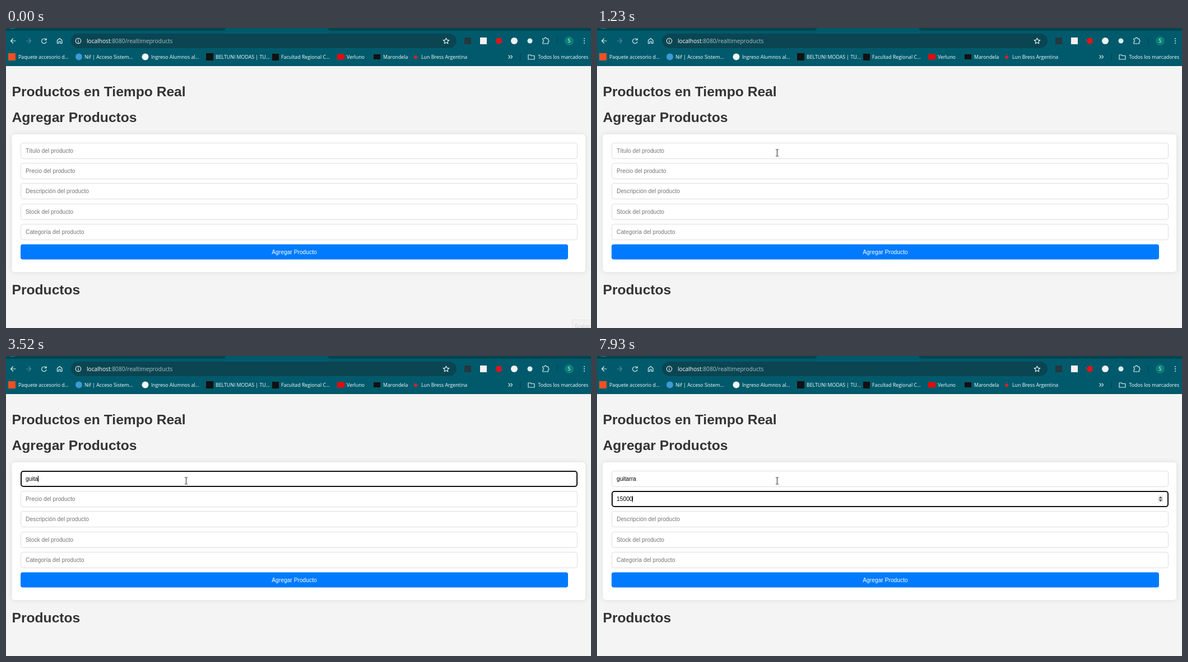
These frames come from a looping animation (1044x536 px, 8 s). An HTML page:

```html
<!DOCTYPE html>
<html lang="es">
<head>
<meta charset="utf-8">
<title>Productos en Tiempo Real</title>
<style>
  html, body { margin: 0; width: 100%; height: 100%; overflow: hidden; background: #f4f4f4; }
  svg { display: block; width: 100%; height: 100%; }
  text { white-space: pre; }
  .ui { font: 8.8px "Open Sans", "Noto Sans", sans-serif; fill: #fff; }
  .url { font-size: 10.17px; }
  .page { font: 10.27px "Liberation Sans", Arial, sans-serif; }
  .title { font-size: 24.64px; font-weight: bold; fill: #333; }
  .hint { fill: #757575; }
  .line { fill: none; stroke: #d9eef2; stroke-width: 1.2; stroke-linecap: round; stroke-linejoin: round; }
  #card { fill: #fff; filter: drop-shadow(0 0 4px rgba(0, 0, 0, .1)); }
  .field { fill: #fff; stroke: #ddd; }
  .field.focus { stroke: #101010; stroke-width: 2; }
</style>
</head>
<body>
<svg id="stage" viewBox="0 0 1044 536">
  <rect width="1044" height="536" fill="#f4f4f4"/>

  <g id="browser">
    <rect width="1044" height="68" fill="#005a6c"/>
    <path d="M0 0H392V1Q392 5 387 5H0ZM574 0H1044V5H580Q575 5 574 0Z" fill="#034450"/>
    <rect x="7" width="9" height="1" fill="#1b8092"/>
    <rect x="116" y="10" width="688" height="26" rx="13" fill="#0b4552"/>

    <g class="line">
      <path d="M17 23H8.500M12.500 19L8.500 23L12.500 27"/>
      <path d="M36 23H44.500M40.500 19L44.500 23L40.500 27" opacity=".35"/>
      <path d="M71.500 21A4.300 4.300 0 1 0 72 24.500M72 18.500V21.500H69"/>
      <path d="M91.500 22L95.800 18.500L100 22V27.500H97.300V24H94.300V27.500H91.500Z"/>
      <circle cx="129" cy="23" r="4.700"/>
      <path d="M129 22.800V25.300M129 20.600V20.700"/>
      <path d="M785.500 18L787 21.300L790.700 21.700L788 24.200L788.700 27.800L785.500 26L782.300 27.800L783 24.200L780.300 21.700L784 21.300Z"/>
      <path d="M958 19H961A1.800 1.800 0 0 1 964.600 19H967.500V21.500A1.800 1.800 0 0 1 967.500 25V28H958V25A1.800 1.800 0 0 0 958 21.500Z"/>
      <path d="M897 49L899.500 51.700L897 54.400M901 49L903.500 51.700L901 54.400"/>
      <path d="M932 48H936L937.500 49.500H943V56H932Z"/>
    </g>
    <path d="M984 17V29M918 46V58" stroke="#043f4b" fill="none"/>
    <circle cx="1005" cy="23" r="8" fill="#087f75"/>
    <text class="ui" x="1002.600" y="26">S</text>
    <text class="ui url" x="144" y="27">localhost<tspan fill="#a8c3c9">:8080/realtimeproducts</tspan></text>
    <g id="dots" fill="#e6f2f4"><circle cx="1032" cy="19" r="1"/><circle cx="1032" cy="23" r="1"/><circle cx="1032" cy="27" r="1"/></g>
  </g>

  <g class="page">
    <text class="title" x="10.500" y="122">Productos en Tiempo Real</text>
    <text class="title" x="10.500" y="167.500">Agregar Productos</text>
    <rect id="card" x="10.500" y="190" width="1023.500" height="246" rx="5"/>
    <g id="form"></g>
    <rect id="button" x="26" y="386.500" width="977" height="27" rx="4"/>
    <text x="514.500" y="403.500" text-anchor="middle" fill="#fff">Agregar Producto</text>
    <text class="title" x="10.500" y="476">Productos</text>
    <g id="spinner">
      <rect x="1001" y="249" width="10" height="13" fill="#efefef"/>
      <path d="M1002.500 254.500L1005.700 251L1009 254.500ZM1002.500 256.500L1005.700 260L1009 256.500Z" fill="#444"/>
    </g>
    <path id="caret" d="M.5 0V11" stroke="#000"/>
  </g>

  <g id="tip">
    <rect x="1010.500" y="521.500" width="40" height="20" fill="#f2f2f2" stroke="#e6e6e6"/>
    <text class="ui" x="1015" y="536" style="fill:#ccc">Grabar</text>
  </g>

  <circle id="click" cx="320" cy="223" r="9" fill="#fbf560"/>
  <path id="arrow" d="M0 0V14L3.300 11L5.500 16L7.500 15L5.400 10.200H10Z" fill="#fff" stroke="#222" stroke-width=".8"/>
  <path id="beam" d="M-2.500 -6H-.8L0 -5.500L.8 -6H2.500M0 -5.500V5.500M-2.500 6H-.8L0 5.500L.8 6H2.500" fill="none"/>
</svg>

<script>
const LOOP = 8000, BLINK = 530;
const $ = id => document.getElementById(id);
const show = (el, on) => el.setAttribute('visibility', on ? 'visible' : 'hidden');
const move = (el, x, y) => el.setAttribute('transform', `translate(${x} ${y})`);

function add(parent, tag, attrs, text = '') {
  const el = document.createElementNS('http://www.w3.org/2000/svg', tag);
  for (const name in attrs) el.setAttribute(name, attrs[name]);
  el.textContent = text;
  return parent.appendChild(el);
}

const browser = $('browser');
const dot = (cx, cy, r, fill) => add(browser, 'circle', { cx, cy, r, fill });
const box = (x, y, width, height, fill) => add(browser, 'rect', { x, y, width, height, fill });

const bookmarks = [
  [22, 'Paquete accesorio d...'], [140, 'Nif | Acceso Sistem...'],
  [259, 'Ingreso Alumnos al...'], [374, 'BELTUNI MODAS | TU...'],
  [491, 'Facultad Regional C...'], [608, 'Verluno'], [673, 'Marondela'],
  [741, 'Lun Bress Argentina'], [949.5, 'Todos los marcadores']
];
bookmarks.forEach(([x, label]) => add(browser, 'text', { x, y: 55, class: 'ui' }, label));

box(4, 45, 13, 13, '#f25022');
dot(130, 51.5, 6, '#3b9bd6');
dot(248.5, 51.5, 6, '#f4f8f9');
box(357, 45, 13, 13, '#111');
box(475, 46, 12, 12, '#111');
box(591, 47, 13, 9, '#f00');
box(656, 47, 12, 9, '#111');
dot(731, 52, 3, '#d2232a');
box(818, 17, 12, 12, '#23383f');
box(846, 17, 12, 12, '#f6f2f2');
dot(879.5, 23, 5.5, '#e0141b');
dot(907, 23, 6, '#f1f1f1');
dot(935, 23, 4.5, '#d8eef2');

const fields = ['Título', 'Precio', 'Descripción', 'Stock', 'Categoría'].map((name, i) => {
  const y = 205 + Math.round(i * 36.2);
  return {
    y, hint: name + ' del producto',
    frame: add($('form'), 'rect', { x: 26.5, y: y + .5, width: 993, height: 28, rx: 4 }),
    label: add($('form'), 'text', { x: 35, y: y + 18 })
  };
});

// Each step: time, focused field, its text.
const typing = [
  [1380, 0, ''], [2900, 0, 'g'], [3120, 0, 'gu'], [3190, 0, 'gui'], [3450, 0, 'guit'],
  [3520, 0, 'guita'], [4310, 0, 'guitar'], [4440, 0, 'guitarr'], [4710, 0, 'guitarra'],
  [6120, 1, ''], [7130, 1, '1'], [7260, 1, '15'], [7530, 1, '150'], [7730, 1, '1500'], [7930, 1, '15000']
];

// Pointer positions: time, x, y.
const pointer = [
  [400, 998.5, 501], [470, 637.5, 332], [540, 493.5, 289], [610, 420.5, 259], [680, 373.5, 241],
  [750, 346.5, 232], [820, 331.5, 227], [890, 324.5, 225], [960, 322.5, 224], [1230, 321.5, 223]
];
const last = (steps, t) => steps.filter(step => step[0] <= t).pop();

function drawForm(t) {
  const [since, focus, typed] = last(typing, t) || [0, -1, ''];
  fields.forEach((field, i) => {
    const active = i === focus;
    const value = active ? typed : i === 0 && focus === 1 ? 'guitarra' : '';
    const inset = active ? 1 : .5;
    const { frame, label, y, hint } = field;
    frame.setAttribute('class', active ? 'field focus' : 'field');
    frame.setAttribute('x', 26 + inset);
    frame.setAttribute('y', y + inset);
    frame.setAttribute('width', 994 - 2 * inset);
    frame.setAttribute('height', 29 - 2 * inset);
    label.textContent = value || hint;
    label.setAttribute('class', value ? '' : 'hint');
    if (active) {
      const width = value ? label.getComputedTextLength() : 0;
      move($('caret'), Math.floor(35 + width), y + 9);
    }
  });
  show($('caret'), focus >= 0 && Math.floor((t - since) / BLINK) % 2 === 0);
  show($('spinner'), focus === 1);
}

function draw(t) {
  drawForm(t);
  $('button').setAttribute('fill', t >= 470 && t < 540 ? '#0056b3' : '#007bff');
  show($('tip'), t < 70);
  show($('click'), t >= 1380 && t < 1510);

  const spot = last(pointer, t);
  const overPage = spot && spot[0] === 400;
  show($('arrow'), overPage);
  show($('beam'), spot && !overPage);
  if (spot) {
    move($('arrow'), spot[1], spot[2]);
    move($('beam'), spot[1], spot[2]);
    $('beam').setAttribute('stroke', t < 610 ? '#2f689c' : '#222');
  }
}

const start = performance.now();
function tick() {
  draw((performance.now() - start) % LOOP);
  requestAnimationFrame(tick);
}
tick();
</script>
</body>
</html>
```
